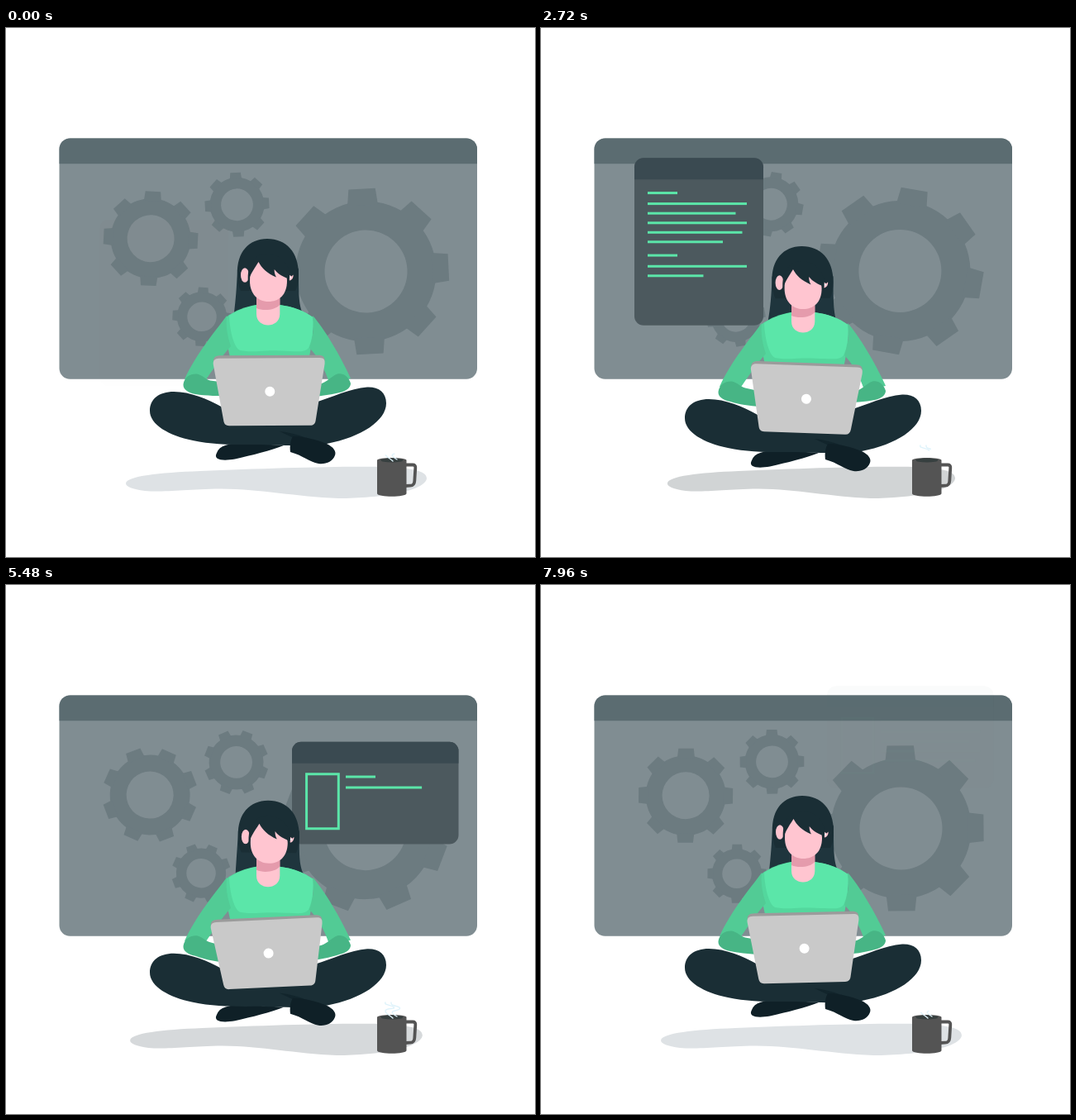
Animation, 640 px wide and 640 px high, one loop 8 s. Source, as an HTML page with a canvas:

```html
<!DOCTYPE html>
<html lang="en">
<head>
<meta charset="utf-8">
<title>Working on a laptop</title>
<style>
  html, body { margin: 0; width: 100%; height: 100%; overflow: hidden; background: #fff; }
  canvas { display: block; width: 640px; height: 640px; }
</style>
</head>
<body>
<canvas id="stage" width="640" height="640"></canvas>
<script>
const ctx = document.getElementById('stage').getContext('2d');
const LOOP = 8000, TAU = Math.PI * 2;
const GREEN = '#5be6a9', HAIR = '#1a2e35', SKIN = '#ffc5d0';
const LEG = '#1a2e35', ARM = '#52cb95', SLEEVE = '#47b585', MUG = '#545454';

const clamp = v => Math.max(0, Math.min(1, v));
const ramp = (t, a, b) => clamp((t - a) / (b - a));
const wave = (t, period) => Math.sin(TAU * t / period);

function fill(d, color) {
  ctx.fillStyle = color;
  ctx.fill(new Path2D(d));
}

function ellipse(x, y, rx, ry, color) {
  ctx.beginPath();
  ctx.ellipse(x, y, rx, ry, 0, 0, TAU);
  ctx.fillStyle = color;
  ctx.fill();
}

function group(draw) {
  ctx.save();
  draw();
  ctx.restore();
}

function turn(x, y, angle) {
  ctx.translate(x, y);
  ctx.rotate(angle);
  ctx.translate(-x, -y);
}

// Rounded panel with a header strip
function panel(x, y, w, h, r, bar, body, head) {
  ctx.beginPath();
  ctx.roundRect(x, y, w, h, r);
  ctx.fillStyle = body;
  ctx.fill();
  ctx.beginPath();
  ctx.roundRect(x, y, w, bar, [r, r, 0, 0]);
  ctx.fillStyle = head;
  ctx.fill();
}

function gear(x, y, size, angle) {
  group(() => {
    ctx.translate(x, y);
    ctx.rotate(angle);
    ctx.translate(0.7, 0);
    ctx.scale(size / 100, size / 100);
    ctx.fillStyle = '#6c7b80';
    ctx.beginPath();
    ctx.arc(0, 0, 85, 0, TAU);
    ctx.arc(0, 0, 50, 0, TAU, true);
    ctx.fill();
    for (let i = 0; i < 8; i++) {
      ctx.beginPath();
      ctx.moveTo(80, -18.5);
      ctx.lineTo(100, -16.2);
      ctx.lineTo(100, 16.2);
      ctx.lineTo(80, 18.5);
      ctx.fill();
      ctx.rotate(TAU / 8);
    }
  });
}

function gears(t) {
  const a = (2.8 + 359.4 * t / LOOP) * Math.PI / 180;
  gear(174.4, 254.7, 57, a);
  gear(278.8, 213.8, 38.8, -a);
  gear(236.3, 349.3, 35.5, a);
  gear(434.8, 294.5, 100, -a);
}

// Types rows of [y, length] until the pen has used up its ink
function typeRows(x, top, rows, ink) {
  ctx.fillStyle = GREEN;
  for (const [y, len] of rows) {
    if (ink <= 0) return;
    ctx.fillRect(x, top + y - 1.5, Math.min(len, ink), 3);
    ink -= len;
  }
}

const CODE = [
  [42.3, 36], [55.3, 120], [66.9, 106.5], [78.5, 120], [90, 114.5], [101.5, 91],
  [117.8, 36], [131, 120], [142.5, 108], [154, 116], [165.6, 91]
];
const NOTES = [[42.3, 36], [55.3, 120.5], [67, 107], [78.6, 120.5], [90, 114.5]];

function codeWindow(t) {
  if (t > 4020) return;
  const y = 231.3 - 0.0272 * t;
  ctx.globalAlpha = ramp(t, 0, 400) * (1 - ramp(t, 3200, 4020));
  panel(113, y, 156, 202.5, 11, 26, '#4c595e', '#3a4a51');
  typeRows(129, y, CODE, 0.328 * (t - 247));
}

function noteWindow(t) {
  if (t < 0) return;
  const y = 230 - 0.0272 * t;
  ctx.globalAlpha = ramp(t, 0, 400) * (1 - ramp(t, 3200, 3970));
  panel(346, y, 201.5, 123.7, 11, 26, '#4c595e', '#3a4a51');
  const drawn = 210 * ramp(t, 100, 790);
  if (drawn > 0) {
    ctx.strokeStyle = GREEN;
    ctx.lineWidth = 3;
    ctx.setLineDash([drawn, 400]);
    ctx.beginPath();
    ctx.moveTo(402.3, y + 39);
    ctx.lineTo(402.3, y + 105);
    ctx.lineTo(363.6, y + 105);
    ctx.lineTo(363.6, y + 39);
    ctx.closePath();
    ctx.stroke();
  }
  typeRows(411, y, NOTES, 0.209 * (t - 868));
}

function shadow(bob) {
  const mix = (a, b) => Math.round(a + (b - a) * bob);
  group(() => {
    ctx.translate(327.3, 0);
    ctx.scale(1 - 0.053 * bob, 1);
    ctx.translate(-327.3, 0);
    fill('M145 551C146 542 185 538 235 536C310 533 400 530 455 531C488 532 509 535 509 545C507 560 455 569 402 569C350 567 310 558 260 557.5C215 558 190 562 168 560C153 558 145 555 145 551Z',
      `rgb(${mix(222, 206)},${mix(226, 209)},${mix(229, 210)})`);
  });
}

// Eased interpolation through [time, value] points
function follow(points, t) {
  for (let i = 1; i < points.length; i++) {
    const [t0, v0] = points[i - 1], [t1, v1] = points[i];
    if (t <= t1) {
      const k = (t - t0) / (t1 - t0);
      return v0 + (v1 - v0) * k * k * (3 - 2 * k);
    }
  }
  return points[points.length - 1][1];
}

const TILT = [[0, 0], [600, -2.7], [1480, 0.8], [2000, 0], [2760, -0.4], [3440, 1], [4000, 0]];

function backHair(sway) {
  const l = 275.8 + sway, r = 358 + sway;
  fill(`M280 292C279 315 278 328 ${l} 346L${r} 343C354 332 354 318 354 292C345 268 290 268 280 292Z`, '#1f353d');
}

function head() {
  fill('M280 298C279 271 294 255 316 255C339 255 354 271 354 298C354 308 352 315 350 318L284 318C281 312 280 306 280 298Z', HAIR);
  ellipse(289, 299, 5, 8.8, SKIN);
  fill('M342 298L345.5 300.5L347.5 298.5C348 302 346 305 343 305.5Z', SKIN);
  fill('M342.5 300L345 301.3L344 303.2L342.3 302.5Z', '#fff');
  fill('M295 306C295 293 299 284 306 282C323 281 340 290 340 306C340 323 330 331 317.5 331C304 331 295 321 295 306Z', SKIN);
  fill('M293 307C294 301 299 293 305.5 283C309 290 316 297 327 301.5C325 298 324.5 295 324.7 292C329 298 336 301 343 304C345 291 337 276 318 273C302 272 291 285 293 307Z', HAIR);
}

function torso() {
  fill('M266 350C278 341 290 337 303 335L331 335C347 337 360 342 371.5 350C373 366 370 383 366 402L272 402C267 383 265 366 266 350Z', '#53d79d');
  fill('M270 348C281 341 291 338 303 335L331 335C347 337 360 342 371.5 350C372 363 371 377 366 387C361 393 352 391 343 391C333 391 326 390 316 390.5C304 391 294 392 283 390C276 386 271 369 270 348Z', GREEN);
  fill('M303 325L331.3 325L331.3 346C331 364 303 364 303 346Z', SKIN);
  fill('M303 325L331.3 325L331.3 335C326 341 312 343 303 339Z', '#e59bac');
}

function arms(t) {
  const leftDrop = 5 - 6 * Math.cos(TAU * (t - 120) / 800);
  const rightDrop = 2 + 3 * Math.cos(TAU * (t - 600) / 800);
  fill('M267 348C254 366 230 394 216 425L240 428C250 414 261 397 272 385C267 370 266 360 267 348Z', ARM);
  fill('M371 348C384 362 405 397 417 424L391 429C386 413 377 397 367 387C372 372 373 360 371 348Z', ARM);
  const l = leftDrop, r = rightDrop;
  fill(`M214.5 431C216 422 223 418 231 418.5C238 420 241 425 247 426.5L272 ${429 + l * .6}L272 ${444 + l}C${258} ${444 + l} 242 ${444 + l * .6} 229 443C220 441 214 437 214.5 431Z`, SLEEVE);
  fill(`M417 430C415 422 408 417 401 418.5C394 421 390 427 382 430L364 ${432 + r * .5}L364 ${444 + r}C378 ${444 + r} 392 ${443 + r * .4} 404 441C412 439 417 435 417 430Z`, SLEEVE);
}

function legs() {
  fill('M255 514C258 505 270 502 288 502L336 505C321 511 297 517 277 521.5C263 524 250 523 255 514Z', '#0f2027');
  fill('M262 459C244 449 223 440 203 440C185 440 174 449 174 463C174 480 197 493 226 499C253 505 284 504 309 504C347 506 373 505 388 503C430 495 460 475 460 454C460 441 451 434 437 434.5C416 436 394 447 374 453C340 470 296 470 262 459Z', LEG);
  fill('M331 488C342 489 352 492 361 495L348 496Z', '#12252c');
  fill('M347 494C361 494 376 498 388 503C396 507 400 512 398 517C395 525 387 528 378 527C367 525 359 517 344 513C343 506 344 499 347 494Z', '#0f2027');
}

function laptop(t) {
  group(() => {
    turn(319, 480, 0.054 * wave(t - 15, 800));
    fill('M251.5 404C251 398 254 396 260 396L378 396C384 396 386.5 398 386 404Z', '#9b9b9b');
    fill('M251.3 407C250.5 402 253 399.3 258 399.3L380 399.3C385 399.3 386.7 402 386 407L374.7 475C374 479 372 481 368 481L270 481C266 481 264 479 263.3 475Z', '#c9c9c9');
    ellipse(319.5, 439.7, 6, 6, '#fff');
  });
}

function woman(t, bob) {
  const beat = t % 4000;
  const tilt = follow(TILT, beat) / 75;
  group(() => {
    ctx.translate(0, 11 * bob);
    group(() => {
      turn(317, 380, tilt);
      backHair(-1.4 * wave(t, 2000));
    });
    torso();
    group(() => {
      turn(317, 380, tilt);
      head();
    });
    arms(t);
    legs();
    laptop(t);
  });
}

const WISPS = [
  'M468 524C464 520 458 518 459 515C461 511 472 514 469 510.5C466 508 457 508 459 505',
  'M473 522C468 519 464 516 471 515C480 513 477 510.5 470 509C465 508 466 506 466 505'
].map(d => new Path2D(d));

function steam(t) {
  const u = ((t + 560) % 4000) / 4000;
  const from = 40 * ramp(u, 0.55, 0.98), to = 40 * ramp(u, 0, 0.5);
  if (to - from < 0.2) return;
  group(() => {
    ctx.strokeStyle = '#dff3fb';
    ctx.lineWidth = 1.4;
    ctx.lineCap = 'round';
    ctx.setLineDash([to - from, 200]);
    ctx.lineDashOffset = -from;
    WISPS.forEach(w => ctx.stroke(w));
  });
}

function mug(t) {
  ctx.strokeStyle = MUG;
  ctx.lineWidth = 3.8;
  ctx.stroke(new Path2D('M483 528.5L492 528.5Q495.5 528.5 495.3 532L494.3 548Q494 553.5 489 553.7L483 554'));
  fill('M449 523C449 519 484.5 519 484.5 523L484.5 563C484.5 568 449 568 449 563Z', MUG);
  ellipse(466.8, 523, 13.5, 2.6, '#363f3f');
  steam(t);
}

function frame(now) {
  const t = now % LOOP;
  const bob = (1 - Math.cos(TAU * t / 2000)) / 2;
  ctx.fillStyle = '#fff';
  ctx.fillRect(0, 0, 640, 640);
  shadow(bob);
  panel(64.5, 133.5, 505.5, 291.2, 13, 30.7, '#808d92', '#5b6c71');
  gears(t);
  group(() => codeWindow(t));
  group(() => noteWindow(t - 4000));
  woman(t, bob);
  mug(t);
}

const start = performance.now();
function tick() {
  frame(performance.now() - start);
  requestAnimationFrame(tick);
}
tick();
</script>
</body>
</html>
```
